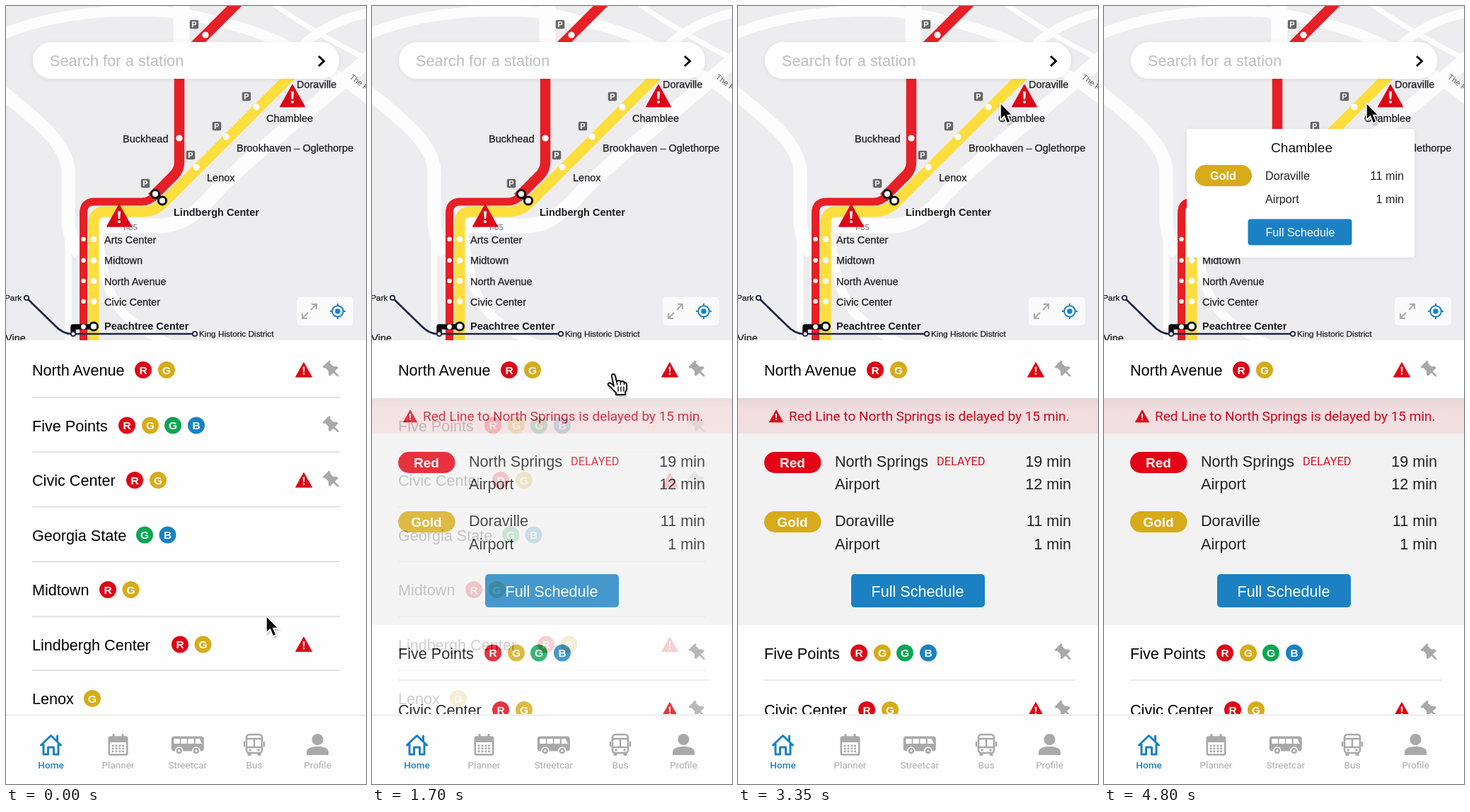
These frames come from a looping animation (509x1101 px, 4850 ms). An HTML page:

```html
<!DOCTYPE html>
<html lang="en">
<head>
<meta charset="utf-8">
<title>Transit map</title>
<style>
  html, body { margin: 0; width: 100%; height: 100%; overflow: hidden; background: #fefefe; }
  svg { display: block; width: 509px; height: 1101px; }
  text { font-family: "Liberation Sans", Arial, sans-serif; font-size: 21.6px; }
  .roboto { font-family: Roboto, sans-serif; }
  .bold { font-weight: 700; }
  .mid { text-anchor: middle; }
  .end { text-anchor: end; }
  .map text { font-size: 14.5px; fill: #1c1c20; stroke: #1c1c20; stroke-width: .25; }
  .map .bold { stroke: none; }
  .map .small { font-size: 11.8px; }
  .map .road { font-size: 11.5px; fill: #666; stroke: none; }
  .roads path { fill: none; stroke: #fdfdfd; stroke-linejoin: round; }
  .line { fill: none; stroke-linejoin: round; }
  .popup text { font-size: 16.2px; fill: #222; }

  .cursor, .arrow, .hand, .details, .popup { animation: 4850ms infinite; }
  .cursor { animation-name: travel; }
  .arrow { animation-name: arrow; animation-timing-function: step-end; }
  .hand { animation-name: hand; animation-timing-function: step-end; }
  .details { animation-name: expand; }
  .popup { animation-name: pop; }

  @keyframes travel {
    0%, 1% { transform: translate(368px, 863px); animation-timing-function: cubic-bezier(.4, 0, .4, 1); }
    13% { transform: translate(339px, 533px); }
    17.5% { transform: translate(339px, 533px); animation-timing-function: ease-in-out; }
    22.5%, 47.5% { transform: translate(341px, 521px); animation-timing-function: ease-in-out; }
    67%, 100% { transform: translate(371px, 137px); }
  }
  @keyframes arrow { 0% { opacity: 1 } 11% { opacity: 0 } 53% { opacity: 1 } 100% { opacity: 1 } }
  @keyframes hand { 0% { opacity: 0 } 11% { opacity: 1 } 53% { opacity: 0 } 100% { opacity: 0 } }
  @keyframes expand { 0%, 32% { opacity: 0 } 38%, 100% { opacity: 1 } }
  @keyframes pop { 0%, 74% { opacity: 0 } 79%, 100% { opacity: 1 } }
</style>
</head>
<body>
<svg id="stage" viewBox="0 0 509 1101" xmlns="http://www.w3.org/2000/svg"></svg>
<script>
const RED = '#dd0716', GOLD = '#d7ab1a', GREEN = '#0ba653', BLUE = '#1b81c2', GREY = '#a9a9a9';
const LINES = { r: ['R', RED], y: ['G', GOLD], g: ['G', GREEN], b: ['B', BLUE] };

const text = (x, y, str, cls = '', attrs = '') => `<text x="${x}" y="${y}" class="${cls}" ${attrs}>${str}</text>`;
const rect = (x, y, w, h, fill, r = 0, attrs = '') =>
  `<rect x="${x}" y="${y}" width="${w}" height="${h}" rx="${r}" fill="${fill}" ${attrs}/>`;
const dot = (x, y, r, fill = '#fff', attrs = '') => `<circle cx="${x}" cy="${y}" r="${r}" fill="${fill}" ${attrs}/>`;
const path = (d, stroke, w, cls = 'line') => `<path d="${d}" class="${cls}" stroke="${stroke}" stroke-width="${w}"/>`;
const at = (x, y, body, more = '') => `<g transform="translate(${x} ${y}) ${more}">${body}</g>`;

// Alert triangle centred on x, y with width w
const alertIcon = (x, y, w) => at(x, y, `
  <path d="M0-11 12 10.5H-12Z" fill="${RED}" stroke="${RED}" stroke-linejoin="round"/>
  <path d="M-1.4-4.5H1.4L.9 3H-.9Z" fill="#fff"/>${dot(0, 5.8, 1.4)}`, `scale(${w / 25})`);

const pin = (x, y) => at(x, y,
  `<path d="M-7-12H7V-8.500H5V-1L9 3V6H1.500V14L0 16-1.500 14V6H-9V3L-5-1V-8.500H-7Z" fill="${GREY}"/>`,
  'rotate(-45) scale(.93)');

const badge = (x, y, line) => {
  const [letter, color] = LINES[line];
  return dot(x, y, 12, color) + text(x, y + 5.5, letter, 'bold mid', 'fill="#fff" style="font-size:15.5px"');
};

const pill = (x, y, label, color, size = 19) =>
  rect(x, y, 80.5, 30, color, 15) +
  text(x + 40, y + 15 + size * .355, label, 'bold mid', `style="font-size:${size}px;fill:#fff"`);

// Station row: name, badge centres by line, icons
const row = (y, name, badges, icons = '') =>
  text(37, y + 8, name) +
  badges.map(([x, line]) => badge(x, y, line)).join('') +
  (icons.includes('!') ? alertIcon(421, y, 24) : '') +
  (icons.includes('p') ? pin(460, y - 1) : '');

const rule = (y, end = 472, color = '#dadada') => path(`M37 ${y}H${end}`, color, 1.6);
const parking = (x, y) => rect(x - 6.2, y - 6.2, 12.4, 12.4, '#666', 2) +
  text(x, y + 4, 'P', 'bold mid', 'style="font-size:11px;fill:#fff"');

const roads = [
  ['M-10 42Q60 12 150 8T290 20Q370 36 430 74T520 138', 15],
  ['M-10 118C25 148 88 190 88 235V300Q88 330 104 350', 19],
  ['M520 68C430 150 340 215 292 268Q255 312 215 311H120', 21],
  ['M248-5V100', 23],
  ['M520 8Q455 20 415 60L390 100', 13],
  ['M375-5Q430 35 520 80', 7],
  ['M130 320Q138 400 160 428T235 480', 13],
  ['M88 290V480', 9]
].map(([d, w]) => path(d, '#fdfdfd', w, '')).join('');

const tracks =
  path('M124 480V307Q124 291 140 291H194Q210 291 222 279L404 97', '#fede3c', 15) +
  path('M109.500 480V293Q109.500 277 125 277H192Q203 277 212 267', '#e71f26', 11) +
  path('M206 271L237 240Q245 232 245 221V78L330-7', '#e71f26', 14.5);

const stops =
  [[282, 41], [245, 187], [354, 143], [311, 185], [269, 228]].map(([x, y]) => dot(x, y, 4.6)).join('') +
  [330, 360, 389, 418].map(y => dot(109.5, y, 3.2) + dot(124, y, 4.3)).join('') +
  path('M211 266L221 276', '#111', 7) +
  [[211, 266], [221, 275.5]].map(([x, y]) => dot(x, y, 5.6, '#fff', 'stroke="#111" stroke-width="3"')).join('');

const streetcarLine =
  path('M95 463V454H124', '#0b0b0b', 7.5) + dot(109.5, 454, 3.4) +
  dot(124, 453.5, 5.6, '#fff', 'stroke="#111" stroke-width="3"') +
  path('M29 413L69 452Q80 464 93 464H267', '#1f2344', 2.6) +
  [[29, 413], [95, 464], [267, 464]].map(([x, y]) => dot(x, y, 3.2, '#fff', 'stroke="#1f2344" stroke-width="1.8"')).join('');

const labels = [
  [411, 116, 'Doraville'], [368, 164, 'Chamblee'], [326, 206, 'Brookhaven – Oglethorpe'],
  [165, 193, 'Buckhead'], [284, 248, 'Lenox'], [237, 297, 'Lindbergh Center', 'bold'],
  [139, 336, 'Arts Center'], [139, 365, 'Midtown'], [139, 395, 'North Avenue'], [139, 424, 'Civic Center'],
  [139, 458, 'Peachtree Center', 'bold'], [273, 468, 'King Historic District', 'small'],
  [-2, 417, 'Park', 'small'], [-1, 475, 'Vine'], [166, 317, 'I-85', 'road']
].map(l => text(...l)).join('');

const map = `<g class="map">${rect(0, 0, 509, 473, '#ededf0')}
  <g class="roads">${roads}</g>${tracks}${stops}${streetcarLine}${labels}
  ${text(485, 102, 'The Perimeter', 'road', 'transform="rotate(36 485 102)"')}
  ${[[266, 26], [340, 128], [298, 170], [261, 211], [197, 251]].map(p => parking(...p)).join('')}
  ${alertIcon(405, 127.5, 36)}${alertIcon(160, 297, 36)}
  ${rect(411, 412, 80, 40, '#fafafa', 5)}
  <g fill="none" stroke="${GREY}" stroke-width="2">
    <path d="M431 430L439 422M432 422H439V429M427 434L419 442M419 435V442H426"/>
    <path d="M469 421V425M469 439V443M458 432H462M476 432H480" stroke="${BLUE}"/>
    <circle cx="469" cy="432" r="7.800" stroke="${BLUE}"/></g>
  ${dot(469, 432, 3.8, BLUE)}</g>`;

const search = rect(38, 51, 433, 52, '#fff', 26, 'filter="url(#soft)"') +
  text(62, 85, 'Search for a station', '', 'fill="#bdbdbd" letter-spacing=".1"') +
  '<path d="M442 71L449.500 78 442 85" fill="none" stroke="#0b0b0b" stroke-width="3"/>';

const fivePoints = [[171, 'r'], [204, 'y'], [236, 'g'], [269, 'b']];
const civic = [[182, 'r'], [215, 'y']];

const list = rect(0, 473, 509, 530, '#fefefe') +
  row(515, 'North Avenue', [[194, 'r'], [227, 'y']], '!p') +
  row(593.5, 'Five Points', fivePoints, 'p') +
  row(671, 'Civic Center', civic, '!p') +
  row(748.5, 'Georgia State', [[196, 'g'], [228.5, 'b']]) +
  row(826, 'Midtown', [[144, 'r'], [176.5, 'y']]) +
  row(903.5, 'Lindbergh Center', [[246, 'r'], [278.5, 'y']], '!') +
  row(980, 'Lenox', [[122, 'y']]) +
  [553.7, 631.2, 708.8, 786.4, 864, 940].map(y => rule(y)).join('');

const trip = (y, place, time) => text(137, y, place) + text(471, y, time, 'end');

const details = `<g class="details">${rect(0, 551, 509, 460, '#fefefe')}
  ${rect(0, 555, 509, 50, 'url(#banner)')}${rect(0, 605, 509, 271, '#f2f2f2')}
  ${alertIcon(54, 580.5, 20)}
  ${text(72, 587, 'Red Line to North Springs is delayed by 15 min.', 'roboto', `style="font-size:19px;fill:#cb0a1d"`)}
  <g fill="#222">${trip(651.5, 'North Springs', '19 min')}${trip(684, 'Airport', '12 min')}
  ${trip(736, 'Doraville', '11 min')}${trip(768.5, 'Airport', '1 min')}</g>
  ${text(281, 650, 'DELAYED', 'roboto', `style="font-size:16.3px;fill:#d31226"`)}
  ${pill(37, 631, 'Red', '#e30415')}${pill(37, 715, 'Gold', GOLD)}
  ${rect(160, 804, 189, 47, BLUE, 5)}${text(254, 836, 'Full Schedule', 'mid', 'fill="#fff"')}
  ${row(915.5, 'Five Points', fivePoints, 'p')}${rule(954, 477, '#e6e6e6')}
  ${row(996, 'Civic Center', civic, '!p')}</g>`;

const popup = `<g class="popup">${rect(117, 174, 322, 182, '#fff', 2, 'filter="url(#soft)"')}
  ${text(279.5, 207, 'Chamblee', 'mid', 'style="font-size:19.1px;fill:#111"')}
  ${pill(128.5, 225, 'Gold', GOLD, 16.2)}
  ${text(228, 246, 'Doraville')}${text(424, 246, '11 min', 'end')}
  ${text(228, 278.5, 'Airport')}${text(424, 278.5, '1 min', 'end')}
  ${rect(203.5, 301.5, 147, 37, BLUE, 4)}
  ${text(277.5, 325.5, 'Full Schedule', 'mid', 'style="fill:#fff"')}</g>`;

const icons = {
  home: `<path d="M-14 1L0-12.500 14 1M-10.500-1V14H-4V4H4V14H10.500V-1M9-4V-12" fill="none" stroke="${BLUE}" stroke-width="3" stroke-linejoin="round" stroke-linecap="round"/>`,
  calendar: rect(-12.7, -10.5, 25.4, 25, 'none', 2, `stroke="${GREY}" stroke-width="2.600"`) +
    rect(-13, -11, 26, 8, GREY) + rect(-8, -15, 3, 6, GREY, 1) + rect(5, -15, 3, 6, GREY, 1) +
    [1, 5, 9].map(y => [-7.5, -2.6, 2.3, 7].map(x => rect(x - 1.3, y - .5, 2.7, 2.7, GREY)).join('')).join(''),
  streetcar: rect(-23, -11.5, 46, 21, GREY, 4) +
    [-19.5, -9.5, .5].map(x => rect(x, -8, 8.5, 7, '#fefefe', 1)).join('') +
    '<path d="M11-8H17L20-1H11Z" fill="#fefefe"/>' +
    [-12, 12].map(x => dot(x, 9, 5, GREY, 'stroke="#fefefe" stroke-width="1.500"') + dot(x, 9, 1.7, '#fefefe')).join(''),
  bus: rect(-11, -14, 22, 26, 'none', 4, `stroke="${GREY}" stroke-width="2.600"`) +
    `<path d="M-11-8H11M-11 4H11M0-8V4M-14-4V3M14-4V3" stroke="${GREY}" stroke-width="2.400"/>` +
    rect(-9.5, 12, 5, 4, GREY, 1) + rect(4.5, 12, 5, 4, GREY, 1) + dot(-6, 8, 1.7, GREY) + dot(6, 8, 1.7, GREY),
  profile: dot(0, -7, 8, GREY) + `<path d="M-15.500 15V11C-15.500 4-6 3 0 3S15.500 4 15.500 11V15Z" fill="${GREY}"/>`
};

const tabs = [[63.5, 'Home', 'home'], [158.5, 'Planner', 'calendar'], [256.8, 'Streetcar', 'streetcar'],
  [351, 'Bus', 'bus'], [440.5, 'Profile', 'profile']];

const nav = rect(0, 1003, 509, 98, '#fefefe') + rect(0, 1002, 509, 3, '#f1f1f1') +
  tabs.map(([x, label, icon], i) => at(x, 1045, icons[icon]) +
    text(x, 1079, label, 'roboto mid', `style="font-size:13.5px;fill:${i ? GREY : BLUE}" ${i ? '' : 'font-weight="500"'}`)).join('');

const cursor = `<g class="cursor">
  <path class="arrow" d="M0 0V24L5.500 19 9.500 29 14 27 10 17.500H17Z" fill="#0a0a0a" stroke="#fff" stroke-width="1.500" filter="url(#shade)"/>
  <g class="hand" fill="#fff" stroke="#0a0a0a" stroke-width="1.900" stroke-linejoin="round" stroke-linecap="round" filter="url(#shade)">
    <path d="M1 17L-2 3Q-2.500 0 0 0T3 3L5 11Q6 8.500 8.500 9T10.500 11.500Q11.500 9.500 14 10T15.500 12.500Q18.500 11 19 15V20Q19 23 17 25.500V29H4V26Q0 23-3 19L-7 15.500Q-8 13-5.500 12.500T1 17Z"/>
    <path d="M5 11L6 15M10.500 11.500V15M15.500 12.500V15M7 18V24M11 18V24M15 18V24" fill="none" stroke-width="1.400"/></g></g>`;

const defs = `<defs>
  <filter id="soft" x="-10%" y="-20%" width="120%" height="150%"><feDropShadow dx="0" dy="1" stdDeviation="3" flood-opacity=".08"/></filter>
  <filter id="shade" x="-40%" y="-40%" width="180%" height="180%"><feDropShadow dx="1" dy="2" stdDeviation="1.500" flood-opacity=".3"/></filter>
  <linearGradient id="banner" x2="0" y2="1"><stop stop-color="#e7d5d6"/><stop offset=".3" stop-color="#f1dddf"/><stop offset="1" stop-color="#f2dfe0"/></linearGradient>
</defs>`;

document.getElementById('stage').innerHTML = defs + map + popup + search + list + details + nav + cursor;
</script>
</body>
</html>
```
